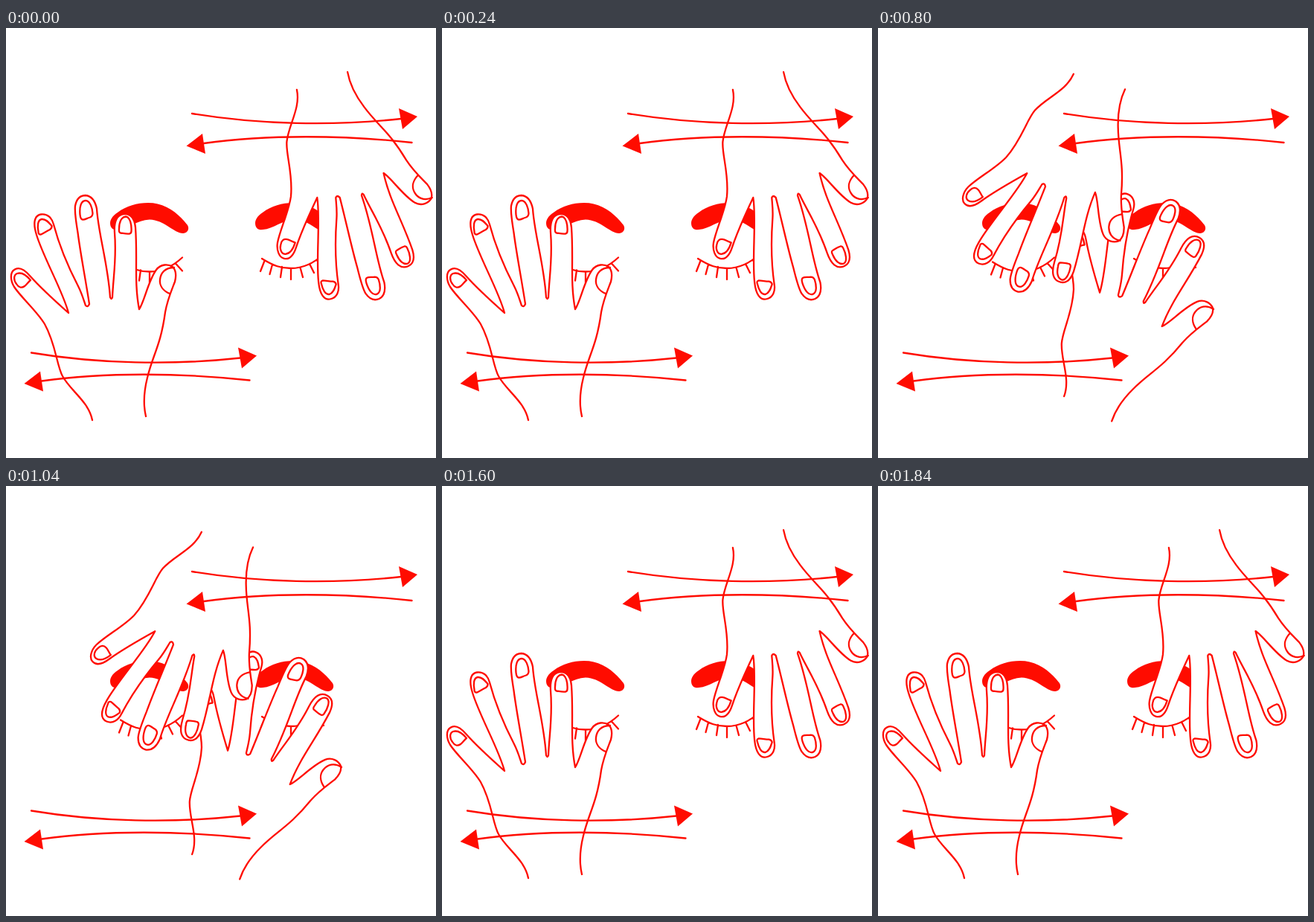
Recreate the animation shown at these times as an HTML page. Size 578x578 px, loop 2000 ms.

```html
<!DOCTYPE html>
<html lang="en">
<head>
<meta charset="utf-8">
<title>Hands waving over eyes</title>
<style>
  html, body { margin: 0; width: 100%; height: 100%; overflow: hidden; background: #fff; }
  svg { display: block; width: 100%; height: 100%; }
  .ink { fill: none; stroke: #ff0c00; stroke-width: 2.3; stroke-linecap: round; stroke-linejoin: round; }
  .solid { fill: #ff0c00; stroke: none; }
</style>
</head>
<body>
<svg viewBox="0 0 578 578" class="ink">
  <defs>
    <path id="brow" class="solid" d="M140 262 C140 257 144 252 150 248 C162 239 176 235 191 235
      C213 235 230 247 244 265 C247 270 244 276 238 276 C226 276 213 258 193 257.500
      C176 258 165 270 150 271 C143 272 140 268 140 262Z"/>
    <path id="lashes" d="M344 310 C360 320 370 323 383 323 C400 323 414 316 427 304
      M347.500 313 L342 327 M358 318 L354.500 331 M371 321 L369 335 M383 323 V338
      M395.500 322 L399 335 M408 317 L414 329 M418 312 L427 322"/>
    <g id="rightArrow">
      <path d="M250 115 C340 130 440 132 531 122"/>
      <path class="solid" d="M553 119 L528 108 L533 136Z"/>
    </g>
    <g id="leftArrow">
      <path d="M545.500 154 C455 144 350 143 266 155"/>
      <path class="solid" d="M242.500 158.500 L264 142 L268 169Z"/>
    </g>
    <g id="hand">
      <!-- arm and little finger, three fingers, thumb and arm -->
      <path fill="#fff" d="M116 527 C111 502 87 488 76 468 C68 453 67 425 52 398
        C42 381 21 363 11 348 C6 340 5 329 11 325 C18 320 25 325 32 333 C48 351 66 367 84 383
        C77 355 50 308 41 278 C36 262 38 252 47 250.500 C56 249 62 256 64 264
        C73 298 84 322 97 347 C103 359 105 368 107 373 Q110 376 112 371
        C107 338 100 303 96.500 275 C94 260 92 247 93 239 C95 229 100 225 107 225 C116 226 120 233 122 243
        C124 276 137 317 140 362 Q142 366 143 362
        C144 335 149 310 146 275 C145 260 149 250 160 250 C170 250 173 259 174 268
        C177 310 172 342 179 378 C186 368 191 340 202 325 C208 317 218 317 224 321
        C229 326 229 333 227 341 C222 354 217 365 214 382 C208 427 197 440 190 470 C185 490 184 505 188 522"/>
      <path d="M33 339 C28 333 21 328 15 330 C10 332 10 339 14 344 C17 349 21 350 25 347 C28 345 30 341 33 339Z"/>
      <path d="M47 277.500 Q43.500 278 43.500 274 C42 266 42.500 258 48 257 C54 256.500 58 262 61.500 266
        Q62 269 59 271 C55 273 51 275.500 47 277.500Z"/>
      <path d="M103 257.500 Q100 257 99.500 251 C98.500 240 101 232 107 232 C113 232 116 242 116.500 249
        Q116.500 253 113 254.500 C109 255.500 106 258 103 257.500Z"/>
      <path d="M154 275.500 Q151.500 275 152 270 C152 261 155 254 161 253.500 C167 254 169 265 168.500 273
        Q168.500 276 166 276.500 C161 277 158 276 154 275.500Z"/>
      <path d="M220 357 C211 353 206 346 207 338 C208 329 214 322 226 322"/>
    </g>
  </defs>

  <use href="#brow"/>
  <use href="#brow" x="195"/>
  <use href="#lashes"/>
  <use href="#lashes" x="-190" y="4.500"/>
  <use id="lower" href="#hand"/>
  <use id="upper" href="#hand"/>
  <use href="#rightArrow"/>
  <use href="#leftArrow"/>
  <use href="#rightArrow" x="-216" y="321.500"/>
  <use href="#leftArrow" x="-218" y="319.500"/>
</svg>
<script>
  const HOLD = 400;
  const SEQUENCE = [0, 1, 2, 1, 0];

  // Each pose: centre x, centre y, rotation in degrees.
  const lowerPoses = [[136.2, 424.7, 0], [224.2, 422.3, 13.4], [320.8, 418.5, 31.5]];
  const upperPoses = [[449.8, 169, -23.2], [375.3, 175, -6.8], [260.3, 166, 12.6]];

  const lower = document.getElementById('lower');
  const upper = document.getElementById('upper');

  function place(hand, [x, y, angle], flip) {
    hand.setAttribute('transform',
      `translate(${x} ${y}) rotate(${angle}) scale(1 ${flip}) translate(-136.2 -424.7)`);
  }

  function draw() {
    const pose = SEQUENCE[Math.floor(performance.now() / HOLD) % SEQUENCE.length];
    place(lower, lowerPoses[pose], 1);
    place(upper, upperPoses[pose], -1);
    requestAnimationFrame(draw);
  }
  draw();
</script>
</body>
</html>
```
